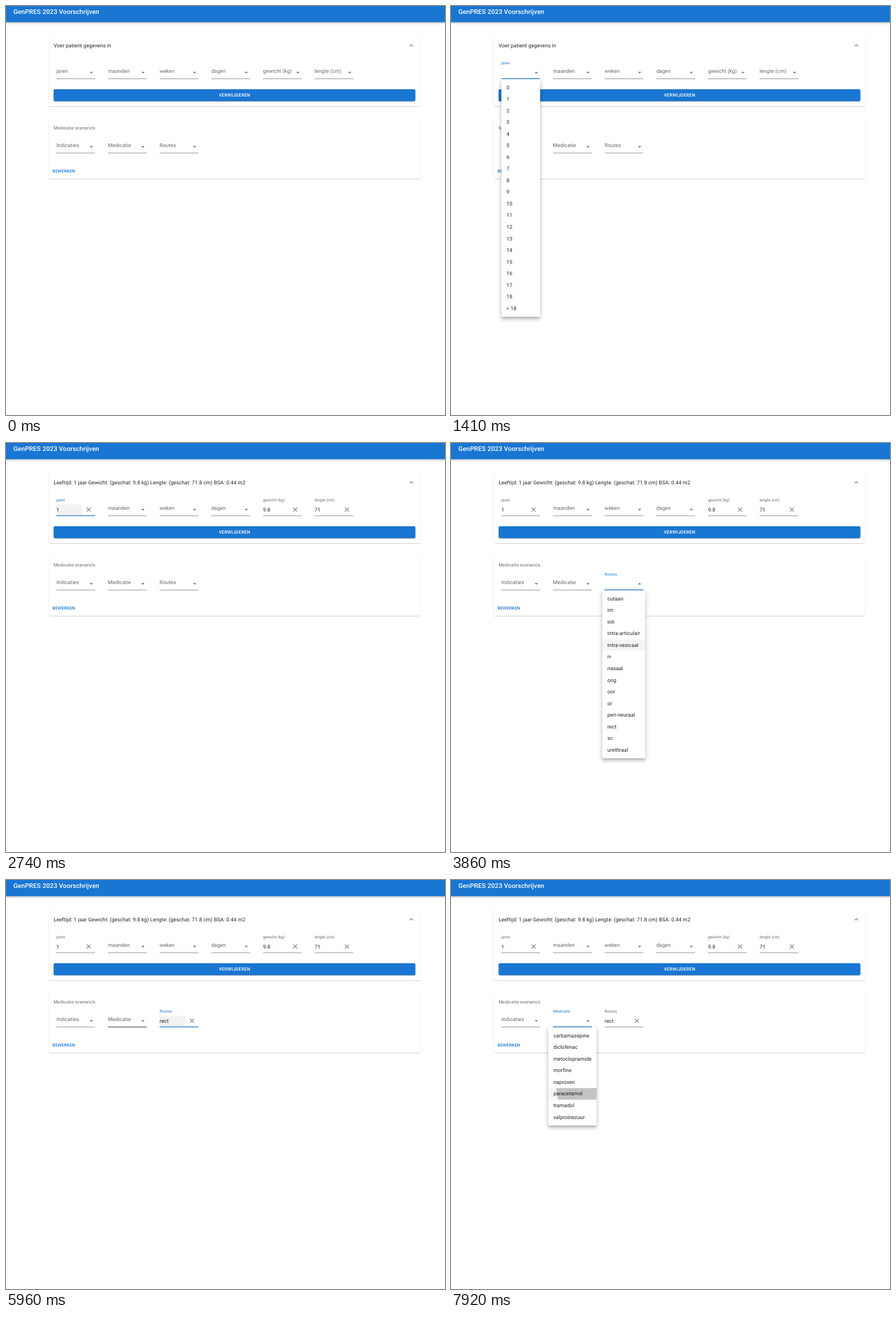
An HTML page with a canvas that plays this animation: 776x722 px, repeating every 7990 ms.

```html
<!DOCTYPE html>
<html lang="nl">
<head>
<meta charset="utf-8">
<title>Voorschrijven</title>
<style>
html, body { margin: 0; width: 100%; height: 100%; overflow: hidden; background: #fff; }
canvas { display: block; }
</style>
</head>
<body>
<canvas id="stage" width="776" height="722"></canvas>
<script>
const ctx = document.getElementById('stage').getContext('2d');
const LOOP = 7990;
const S = 0.5703;               // page zoom: design pixels to stage pixels
const ROW = 36 * S, PAD = 8 * S;
const BLUE = '#1976d2', INK = 'rgba(0,0,0,.87)', DIM = 'rgba(0,0,0,.6)', ICON = 'rgba(0,0,0,.54)';

// Shadows as [offset, blur, spread, alpha]
const SHADOW = {
  card: [[2, 1, -1, .2], [1, 1, 0, .14], [1, 3, 0, .06]],
  button: [[3, 1, -2, .2], [2, 2, 0, .14], [1, 5, 0, .12]],
  bar: [[2, 4, -1, .2], [4, 5, 0, .14], [1, 10, 0, .12]],
  menu: [[5, 5, -3, .2], [8, 10, 1, .14], [3, 14, 2, .12]]
};

let t = 0;

const clamp = v => Math.min(1, Math.max(0, v));

function bezier(x1, y1, x2, y2) {
  const at = (a, b, u) => 3 * a * u * (1 - u) ** 2 + 3 * b * u * u * (1 - u) + u ** 3;
  return x => {
    if (x <= 0 || x >= 1) return clamp(x);
    let lo = 0, hi = 1;
    for (let i = 0; i < 20; i++) {
      const mid = (lo + hi) / 2;
      if (at(x1, x2, mid) < x) lo = mid; else hi = mid;
    }
    return at(y1, y2, lo);
  };
}
const easeOut = bezier(0, 0, .2, 1);
const easeInOut = bezier(.4, 0, .2, 1);

// 0 to 1 after `from`, back to 0 after `to`
const span = ([from, to = Infinity]) => easeOut((t - from) / 200) - easeOut((t - to) / 200);

function text(str, x, y, { size = 16, color = INK, weight = 400, gap = .00938, align = 'left' } = {}) {
  const px = size * S;
  ctx.font = `${weight} ${px}px Roboto, sans-serif`;
  ctx.letterSpacing = px * gap + 'px';
  ctx.textRendering = 'geometricPrecision';
  ctx.textAlign = align;
  ctx.fillStyle = color;
  ctx.fillText(str, x, y);
}

function roundRect(x, y, w, h, r) {
  ctx.beginPath();
  ctx.roundRect(x, y, w, h, r);
  ctx.fill();
}

function box(x, y, w, h, color, shadow, r = 4 * S) {
  const far = 2000, { a, d } = ctx.getTransform();
  for (const [dy, blur, spread, alpha] of shadow) {
    const s = spread * S;
    ctx.save();
    ctx.shadowColor = `rgba(0,0,0,${alpha})`;
    ctx.shadowBlur = blur * S * a;
    ctx.shadowOffsetX = far * a;
    ctx.shadowOffsetY = dy * S * d;
    ctx.fillStyle = '#000';
    roundRect(x - s - far, y - s, w + 2 * s, h + 2 * s, r);
    ctx.restore();
  }
  ctx.fillStyle = color;
  roundRect(x, y, w, h, r);
}

// Draws polygon points given relative to an icon's centre
function icon(cx, cy, points, flip = 1) {
  ctx.beginPath();
  for (const [x, y] of points) ctx.lineTo(cx + x * S, cy + y * S * flip);
  ctx.fillStyle = ICON;
  ctx.fill();
}
const CARET = [[-5, -2], [0, 3], [5, -2]];
const CHEVRON = [[0, -4], [-6, 2], [-4.59, 3.41], [0, -1.17], [4.59, 3.41], [6, 2]];

function cross(cx, cy) {
  const r = 6.3 * S;
  ctx.beginPath();
  for (const k of [1, -1]) {
    ctx.moveTo(cx - r, cy - r * k);
    ctx.lineTo(cx + r, cy + r * k);
  }
  ctx.strokeStyle = ICON;
  ctx.lineWidth = 2 * S;
  ctx.stroke();
}

// y is the top of the underline
function field({ label, col, y = 128, value, set = Infinity, hover = [Infinity], focus = [Infinity] }) {
  const x = 89 + 91.3 * col, w = 120 * S;
  const active = span(focus), filled = t >= set;
  const up = easeOut((t - Math.min(focus[0], set)) / 200);

  if (filled && t >= focus[0] && t < focus[1]) {
    ctx.fillStyle = 'rgba(0,0,0,.05)';
    ctx.fillRect(x, y - 19.5, 80 * S, 19);
  }
  ctx.fillStyle = `rgba(0,0,0,${.42 + .45 * span(hover)})`;
  ctx.fillRect(x, y, w, 1);
  ctx.fillStyle = BLUE;
  ctx.fillRect(x + w / 2 * (1 - active), y - .3, w * active, 1.3);

  const mix = (a, b) => Math.round(a + (b - a) * active);
  text(label, x, y - 9.7 - 14.9 * up, {
    size: 16 - 4 * up,
    color: `rgb(${mix(102, 25)},${mix(102, 118)},${mix(102, 210)})`
  });

  if (filled) {
    text(value, x, y - 7.5);
    cross(x + 57, y - 10.5);
  } else {
    icon(x + 61.8, y - 10.5, CARET, t >= focus[0] ? -1 : 1);
  }
}

function ripple({ x, w, shut, hit }, top) {
  const p = easeInOut((t - hit.at) / 550);
  if (p <= 0) return;
  const reach = (v, lo, size) => Math.max(v - lo, lo + size - v) * 2 + 2;
  const r = Math.hypot(reach(hit.x, x, w), reach(hit.y, top, ROW)) / 2;
  const fade = 1 - easeInOut((t - shut) / 550);
  ctx.save();
  ctx.beginPath();
  ctx.rect(x, top, w, ROW);
  ctx.clip();
  ctx.beginPath();
  ctx.arc(hit.x, hit.y, r * p, 0, 7);
  ctx.fillStyle = `rgba(0,0,0,${.87 * (.1 + .2 * p) * fade})`;
  ctx.fill();
  ctx.restore();
}

function menu(m) {
  const { x, y, w, items, open, shut = Infinity, hover, hit } = m;
  const h = items.length * ROW + 2 * PAD;
  const c = h / S / 36;
  const time = (4 + 15 * c ** .25 + c / 5) * 10;
  const alpha = easeInOut((t - open) / time) - easeInOut((t - shut) / time);
  if (alpha <= 0) return;
  const grow = easeInOut((t - open) / (time * .666)) - easeInOut((t - shut - time / 3) / (time * .666));

  ctx.save();
  ctx.globalAlpha = alpha;
  ctx.translate(x + w / 2, y);
  ctx.scale(.75 + .25 * grow, .5625 + .4375 * grow);
  ctx.translate(-x - w / 2, -y);
  box(x, y, w, h, '#fff', SHADOW.menu);

  const over = hover.findLastIndex(at => t >= at);
  items.forEach((item, i) => {
    const top = y + PAD + i * ROW;
    if (i === over) {
      ctx.fillStyle = 'rgba(0,0,0,.04)';
      ctx.fillRect(x, top, w, ROW);
    }
    text(item, x + 16 * S, top + ROW / 2 + 2.9);
    if (i === hit.row) ripple(m, top);
  });
  ctx.restore();
}

const AGE_SET = 2340, ROUTE_SET = 4880;
const AGE_OPEN = 1030, ROUTE_OPEN = 3140, DRUG_OPEN = 6220;

const fields = [
  { label: 'jaren', col: 0, value: '1', set: AGE_SET, hover: [460, AGE_OPEN], focus: [AGE_OPEN, ROUTE_OPEN] },
  { label: 'maanden', col: 1 },
  { label: 'weken', col: 2 },
  { label: 'dagen', col: 3 },
  { label: 'gewicht (kg)', col: 4, value: '9.8', set: AGE_SET },
  { label: 'lengte (cm)', col: 5, value: '71', set: AGE_SET },
  { label: 'Indicaties', col: 0, y: 259 },
  { label: 'Medicatie', col: 1, y: 259, hover: [5840, DRUG_OPEN], focus: [DRUG_OPEN] },
  { label: 'Routes', col: 2, y: 259, value: 'rect', set: ROUTE_SET, hover: [2920, ROUTE_OPEN], focus: [ROUTE_OPEN, DRUG_OPEN] }
];

// hover: the time at which the pointer reaches each row in turn
const menus = [
  {
    x: 89, y: 128.9, w: 68.5, open: AGE_OPEN, shut: AGE_SET,
    items: [...Array(19).keys(), '> 18'],
    hover: [2060, 2170], hit: { row: 1, at: 2230, x: 110, y: 164 }
  },
  {
    x: 267.4, y: 260.1, w: 76.1, open: ROUTE_OPEN, shut: ROUTE_SET,
    items: ['cutaan', 'im', 'inh', 'intra-articulair', 'intra-vesicaal', 'iv', 'nasaal',
      'oog', 'oor', 'or', 'peri-neuraal', 'rect', 'sc', 'urethraal'],
    hover: [3570, 3710, 3750, 3790, 3850, 3910, 3950, 3990, 4270, 4480, 4620, 4740],
    hit: { row: 11, at: 4800, x: 295, y: 500 }
  },
  {
    x: 171.8, y: 260.1, w: 85.5, open: DRUG_OPEN,
    items: ['carbamazepine', 'diclofenac', 'metoclopramide', 'morfine', 'naproxen',
      'paracetamol', 'tramadol', 'valproinezuur'],
    hover: [6540, 6720, 6930, 7130, 7240, 7340],
    hit: { row: 5, at: 7685, x: 223, y: 371 }
  }
];

function draw() {
  ctx.fillStyle = '#fff';
  ctx.fillRect(0, 0, 776, 722);

  box(0, -4, 776, 32.6, BLUE, SHADOW.bar, 0);
  text('GenPRES 2023 Voorschrijven', 13, 14.4, { size: 20, weight: 500, gap: .0075, color: '#fff' });

  box(75.6, 51.5, 657, 126, '#fff', SHADOW.card);
  text(t < AGE_SET ? 'Voer patient gegevens in'
    : 'Leeftijd: 1 jaar Gewicht: (geschat: 9.8 kg) Lengte: (geschat: 71.8 cm) BSA: 0.44 m2', 84.3, 72.6);
  icon(716.6, 69.6, CHEVRON);
  box(84.2, 147, 639.4, 21, BLUE, SHADOW.button);
  text('VERWIJDEREN', 404, 160.4, { size: 14, weight: 500, gap: .02857, color: '#fff', align: 'center' });

  box(75.6, 199, 657, 106, '#fff', SHADOW.card);
  text('Medicatie scenario\'s', 84.3, 218, { size: 14, gap: .01071, color: DIM });
  text('BEWERKEN', 82.3, 294, { size: 13, weight: 500, gap: .02857, color: BLUE });

  fields.forEach(field);
  menus.forEach(menu);
}

function tick(now) {
  t = now % LOOP;
  draw();
  requestAnimationFrame(tick);
}
requestAnimationFrame(tick);
</script>
</body>
</html>
```
